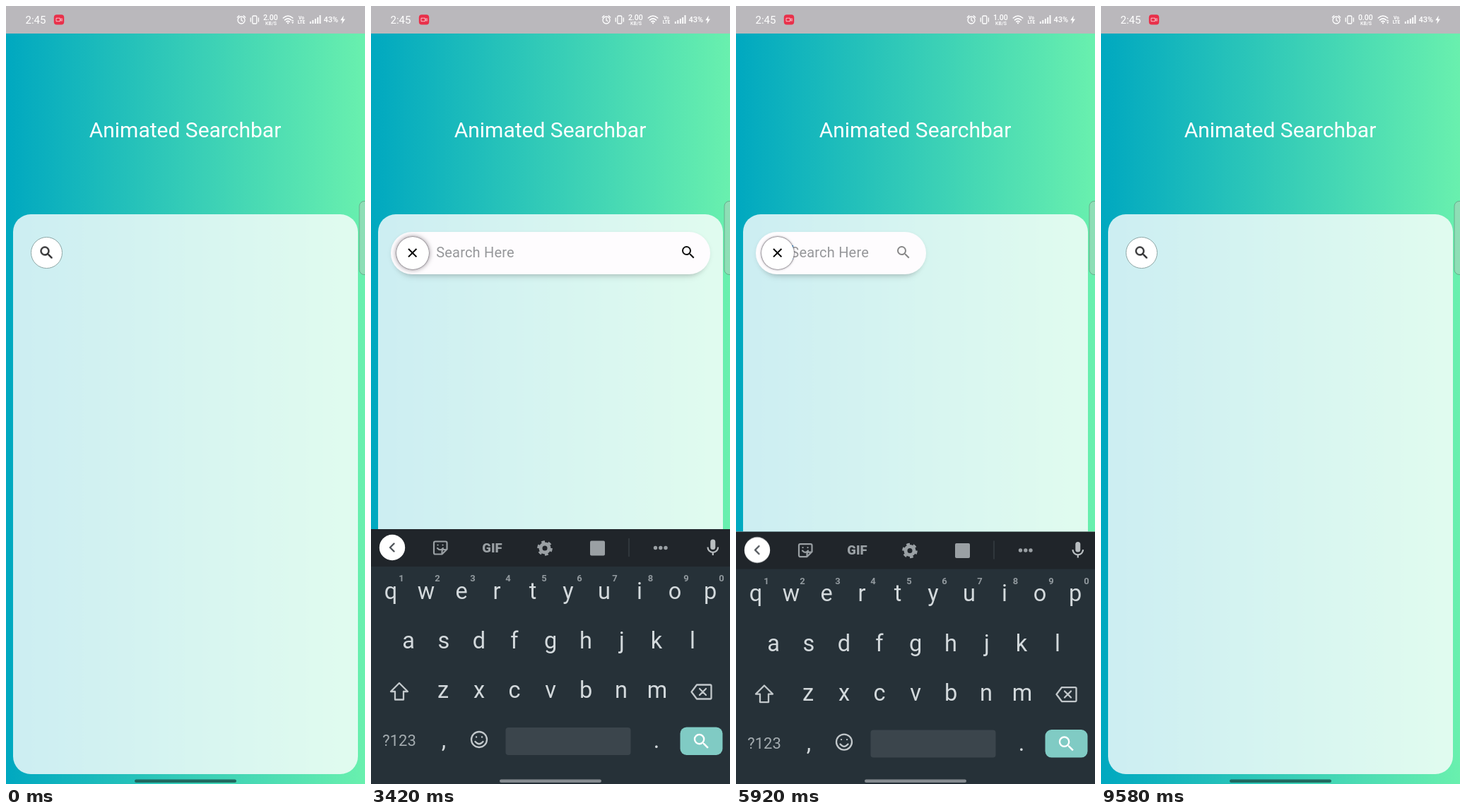
An HTML page that plays this animation: 508 px wide and 1102 px high, repeating every 9.66 s.

```html
<!DOCTYPE html>
<html lang="en">
<head>
<meta charset="utf-8">
<title>Animated Searchbar</title>
<style>
@property --p { syntax: "<number>"; inherits: true; initial-value: 0; }
@property --kb { syntax: "<length>"; inherits: true; initial-value: 361px; }
@property --cut { syntax: "<length>"; inherits: true; initial-value: 0px; }
@property --fade { syntax: "<number>"; inherits: true; initial-value: 0; }

html, body { margin: 0; width: 100%; height: 100%; overflow: hidden; }
body { font-family: Roboto, "Noto Sans", sans-serif; }

/* --p: bar progress, --kb: keyboard offset, --cut: hidden bottom of the page, --fade: hint */
.stage {
  --quad: cubic-bezier(.333, .667, .667, 1);
  position: relative; width: 508px; height: 1102px; overflow: hidden; background: #fafafc;
  animation: bar 9.66s ease-out infinite, keys 9.66s var(--quad) infinite,
    cut 9.66s var(--quad) infinite, hint 9.66s linear infinite;
}
@keyframes bar {
  0%, 18.054%, 48.634%, 58.416%, 85.217%, 100% { --p: 0; }
  28.406%, 38.282%, 68.768%, 74.865% { --p: 1; }
}
@keyframes keys {
  0%, 18.675%, 40.6%, 59.037%, 76.894%, 100% { --kb: 361px; }
  21.18%, 37.836%, 61.542%, 74.13% { --kb: 0px; }
}
@keyframes cut {
  0%, 18.675%, 40.383%, 59.037%, 76.687%, 100% { --cut: 0px; }
  21.18%, 38.716%, 61.542%, 75.03% { --cut: 361px; }
}
@keyframes hint {
  0%, 18.054%, 40.166%, 58.416%, 76.656%, 100% { --fade: 0; }
  20.124%, 38.199%, 60.487%, 74.586% { --fade: 1; }
}

/* Hard switches */
.step { animation: 9.66s step-end infinite; }
.wide { animation-name: wide; }
.slim { animation-name: slim; }
.on { animation-name: on; }
.off { animation-name: off; }
.up { animation-name: up; }
.down { animation-name: down; }
.caret { animation-name: caret; }
.two { animation-name: two; }
.one { animation-name: one; }
.zero { animation-name: zero; }
.traffic { animation-name: traffic; }
@keyframes wide { 0%, 48.76%, 85.3%, 100% { opacity: 0; } 18.054%, 58.416% { opacity: 1; } }
@keyframes slim { 0%, 48.76%, 85.3%, 100% { opacity: 1; } 18.054%, 58.416% { opacity: 0; } }
@keyframes on { 0%, 38.199%, 74.431%, 100% { opacity: 0; } 18.054%, 58.416% { opacity: 1; } }
@keyframes off { 0%, 38.199%, 74.431%, 100% { opacity: 1; } 18.054%, 58.416% { opacity: 0; } }
@keyframes up { 0%, 40.4%, 76.7%, 100% { opacity: 0; } 18.8%, 59.1% { opacity: 1; } }
@keyframes down { 0%, 40.4%, 76.7%, 100% { opacity: 1; } 18.8%, 59.1% { opacity: 0; } }
@keyframes caret {
  0%, 23.23%, 33.644%, 63.592%, 73.944%, 100% { opacity: 0; }
  18.054%, 28.468%, 58.416%, 68.768% { opacity: 1; }
}
@keyframes two { 0% { opacity: 1; } 38.82%, 100% { opacity: 0; } }
@keyframes one { 0%, 67.29%, 100% { opacity: 0; } 38.82% { opacity: 1; } }
@keyframes zero { 0% { opacity: 0; } 67.29%, 100% { opacity: 1; } }
@keyframes traffic { 0%, 98.34%, 100% { opacity: 1; } 35.4% { opacity: 0; } }

.stage > *, .page > *, .pill > * { position: absolute; }
svg { display: block; }
.page {
  inset: 0; background: linear-gradient(90deg, #00a8c0, #69f0ae);
  clip-path: inset(0 0 var(--cut) 0);
}
.panel {
  left: 10px; top: 295px; width: 488px; height: 793px; border-radius: 25px;
  background: rgba(255, 255, 255, .8);
}
h1 {
  margin: 0; left: 0; top: 156px; width: 507px; text-align: center;
  font-size: 30px; font-weight: 400; line-height: 40px; color: #fff;
}
.pill {
  left: 28px; top: 320px; height: 59.5px; width: min(452px, 60px + var(--p) * 434px);
  border-radius: 30px; background: #fefcfe; overflow: hidden;
  box-shadow: 0 12px 12px -12px rgba(0, 0, 0, .26), 0 2px 6px rgba(0, 0, 0, .07);
}
.pill p {
  margin: 0; left: calc(38.8px + var(--p) * 25.4px); top: 14px; line-height: 30px;
  font-size: 20px; letter-spacing: .2px; white-space: nowrap;
  color: #96979a; opacity: var(--fade);
}
.pill i { left: calc(41px + var(--p) * 25px); top: 19px; width: 2px; height: 20px; background: #2196f3; }
.pill svg { right: 19.3px; top: 17px; opacity: min(1, var(--p) + .08); }
.knob {
  left: 35.5px; top: 326.5px; width: 46px; height: 46px; border-radius: 50%; background: #fff;
  box-shadow: 0 0 1px .5px rgba(70, 65, 75, .6), 0 0 calc(1px + var(--p) * 6px) rgba(60, 50, 60, .65);
}
.dot {
  left: 35px; top: 327px; width: 43px; height: 43px; border-radius: 50%;
  border: 1px solid #8da5a4; background: #fff;
}
.board { transform: translateY(var(--kb)); }
.mid { text-anchor: middle; }
.line { fill: none; stroke-linecap: round; stroke-linejoin: round; }
.butt { stroke-linecap: butt; }
</style>
</head>
<body>
<svg width="0" height="0" style="position:absolute">
  <defs>
    <path id="lens" d="M15.5 14h-.79l-.28-.27A6.47 6.47 0 0 0 16 9.5 6.5 6.5 0 1 0 9.5 16c1.61 0 3.09-.59 4.23-1.57l.27.28v.79l5 4.99L20.49 19l-4.99-5zm-6 0C7.01 14 5 11.99 5 9.5S7.01 5 9.5 5 14 7.01 14 9.5 11.99 14 9.5 14z"/>
  </defs>
</svg>

<div class="stage">
  <div class="page">
    <h1>Animated Searchbar</h1>
    <div class="panel"></div>
    <div class="pill step wide">
      <p>Search Here</p>
      <i class="step caret"></i>
      <svg width="24" height="24"><use href="#lens" fill="#111"/></svg>
    </div>
    <div class="knob step wide"></div>
    <div class="dot step slim"></div>
    <svg width="100" height="400">
      <g fill="#0b0b0d">
        <use href="#lens" x="45.5" y="337.5" class="step slim"/>
        <g class="step wide"><use href="#lens" x="46.7" y="337.5" class="step off"/></g>
      </g>
      <path class="step on" d="M53 344l11.4 11.4M64.4 344L53 355.4" stroke="#000" stroke-width="2"/>
    </svg>
  </div>

  <!-- Keyboard -->
  <svg class="board" width="508" height="1102">
    <rect y="741" width="508" height="362" fill="#263138"/>
    <rect y="741" width="508" height="53" fill="#20252a"/>
    <circle cx="30" cy="767" r="18.2" fill="#fff"/>
    <g class="line" stroke="#50555a" stroke-width="2.4">
      <path class="step on" d="M32.5 761.5L27 767l5.5 5.5"/>
      <path class="step off" d="M27.5 761.5L33 767l-5.5 5.5"/>
    </g>
    <g class="step on">
      <g class="line" stroke="#9aa0a4" stroke-width="2.2">
        <path d="M91 758.5h14.5q2 0 2 2v9l-7 7H91q-2 0-2-2v-14q0-2 2-2zM107 770h-4q-2.5 0-2.5 2.5v4M94 768q4 4.500 8 0"/>
        <path d="M94.5 763.5h.1M101.5 763.5h.1"/>
        <circle cx="246" cy="768" r="6" stroke-width="5"/>
        <circle class="butt" cx="246" cy="768" r="9.3" stroke-width="3" pathLength="12" stroke-dasharray="1 1"/>
      </g>
      <text class="mid" x="171.5" y="773.5" font-size="18.5" font-weight="900" fill="#9aa0a4">GIF</text>
      <rect x="310" y="757.5" width="21" height="21" rx="2" fill="#9aa0a4"/>
      <path d="M365 754v26" stroke="#3c4349" stroke-width="1.2"/>
      <g fill="#9aa0a4"><circle cx="402.5" cy="767.5" r="2.7"/><circle cx="409.8" cy="767.5" r="2.7"/><circle cx="417" cy="767.5" r="2.7"/></g>
    </g>
    <rect x="480.3" y="755.5" width="7" height="14.5" rx="3.5" fill="#b9bec1"/>
    <path d="M476.5 766.5a7.3 7.3 0 0 0 14.6 0M483.8 774v4" fill="none" stroke="#b9bec1" stroke-width="2.2"/>

    <g class="mid" font-size="32.5" fill="#d3d9dc">
      <text y="839.5" x="28 78 128 178 229 279 330 380 430 480">qwertyuiop</text>
      <text y="910.2" x="53 103 153 203 254 304 355 404 455">asdfghjkl</text>
      <text y="980.3" x="102 153 203 254 304 354 405">zxcvbnm</text>
      <text y="1051" x="103 404">,.</text>
    </g>
    <text class="mid" y="815" x="43 94 144 194 245 295 345 395.5 446 496" font-size="13" font-weight="700" fill="#929a9f">1234567890</text>
    <text class="mid" x="40" y="1048" font-size="22" fill="#a3abaf">?123</text>
    <g class="line" stroke="#c2c8cb" stroke-width="2.3">
      <path d="M40 959l12 12h-6v11.500H34V971h-6z"/>
      <path d="M461 961.5h19q1.5 0 1.5 1.5v17q0 1.5-1.5 1.5h-19l-7.5-10zM465 967l9 9M474 967l-9 9"/>
      <circle cx="153" cy="1039" r="11"/>
      <path d="M147.5 1042q5.5 6.5 11 0M149 1035.5h.1M157 1035.5h.1"/>
    </g>
    <rect x="190.5" y="1022" width="177" height="39" rx="4" fill="#3b454c"/>
    <rect x="437.5" y="1021.5" width="60" height="39.5" rx="9" fill="#80cbc4"/>
    <g transform="translate(453.2 1027.2) scale(1.2)" fill="#fff"><use href="#lens"/></g>
  </svg>

  <!-- System bars -->
  <svg width="508" height="1102">
    <rect width="508" height="39" fill="#bab8bc"/>
    <rect x="500" y="276.5" width="20" height="104" rx="7" fill="#b4cdbd" fill-opacity=".5" stroke="#5c8f78" stroke-opacity=".65"/>
    <rect class="step down" x="182" y="1095.5" width="144" height="4.5" rx="2.2" fill="#1f5f57" fill-opacity=".9"/>
    <rect class="step up" x="182" y="1095.5" width="144" height="4.5" rx="2.2" fill="#858b90"/>

    <g fill="#fff">
      <text x="27.5" y="24.5" font-size="15">2:45</text>
      <rect x="67.8" y="12.2" width="14.4" height="14.4" rx="4" fill="#e9304a"/>
      <path d="M71 17.2h5.500v4.500H71zM77 19l2.200-1.300v3.600L77 20" fill="none" stroke="#fff" stroke-width=".8" stroke-opacity=".85"/>
      <g class="line" stroke="#fff" stroke-width="1.3">
        <circle cx="333" cy="20" r="5"/>
        <path d="M333 17v3.200l2 1.300M327.3 16l2.500-2.300M338.7 16l-2.500-2.300"/>
        <rect x="348.8" y="14" width="6" height="11" rx="1.3"/>
        <path d="M346.2 17v5M357.4 17v5"/>
        <path d="M392.3 17q6.700-6 13.400 0M394.5 19.8q4.500-4 9 0M396.8 22.3q2.200-2 4.400 0" stroke-width="1.6"/>
      </g>
      <circle cx="399" cy="24.3" r="1.1"/>
      <path class="step traffic" d="M404 21.5l1.700-2.300 1.700 2.300zM404 22.7h3.400l-1.700 2.300z"/>
      <g class="mid" font-weight="500">
        <g font-size="10.5">
          <text class="step two" x="374.3" y="19.5">2.00</text>
          <text class="step one" x="374.3" y="19.5">1.00</text>
          <text class="step zero" x="374.3" y="19.5">0.00</text>
        </g>
        <text x="375" y="26.5" font-size="7">KB/S</text>
        <g font-size="6.5" font-weight="700"><text x="418" y="18.5">Vo</text><text x="418" y="25">LTE</text></g>
        <text x="459.7" y="23" font-size="11">43%</text>
      </g>
      <path d="M430.8 25v-3M434.3 25v-5M437.8 25v-7M441.2 25v-9M444.5 25v-12" stroke="#fff" stroke-width="1.9"/>
      <path d="M477.8 13.5l-4.600 6.800h2.900l-1 5.200 4.900-7h-3z"/>
    </g>
  </svg>
</div>
</body>
</html>
```
